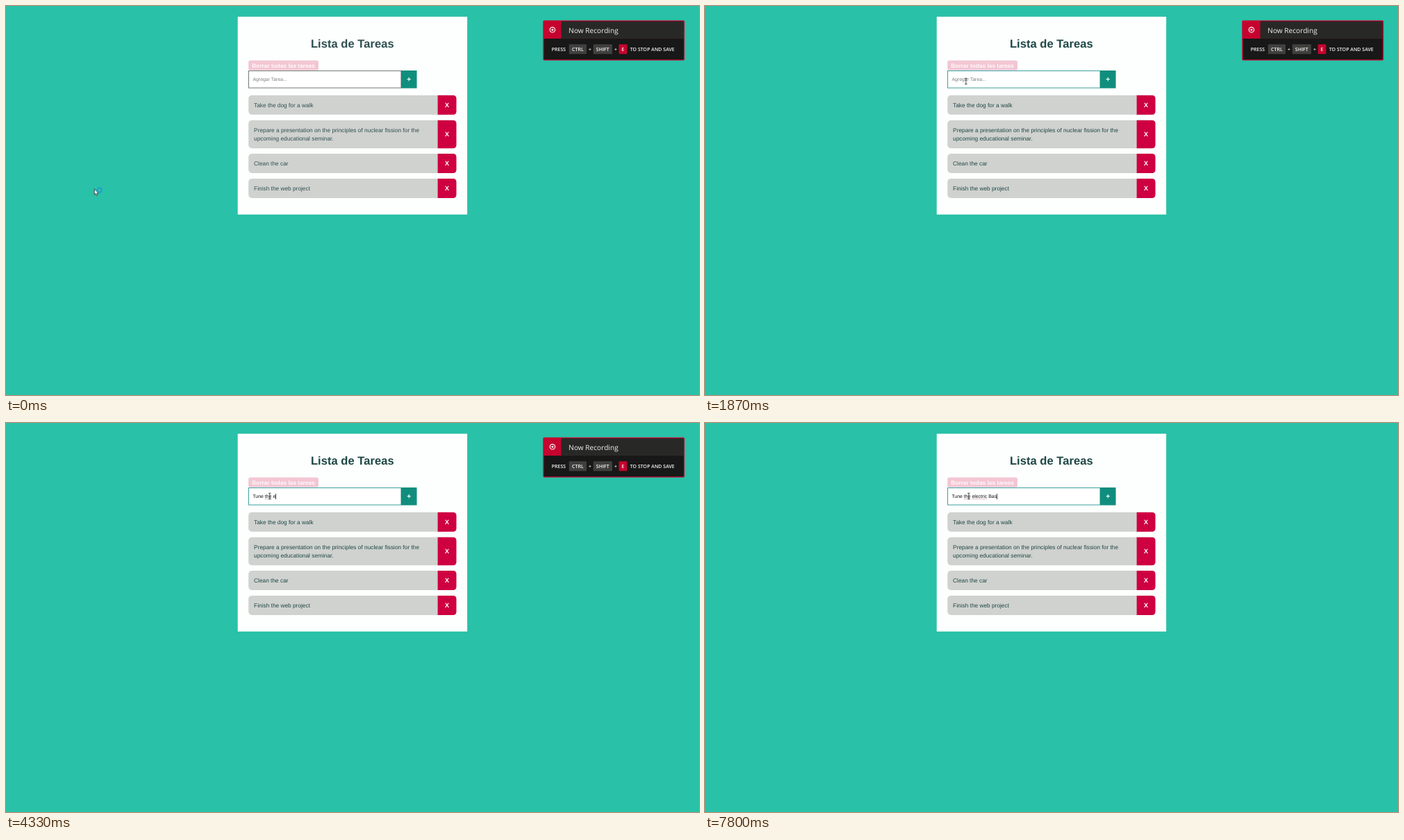
These frames come from a looping animation (998 by 561 pixels, 8 s). An HTML page:

```html
<!DOCTYPE html>
<html lang="es">
<head>
<meta charset="utf-8">
<title>Lista de Tareas</title>
<style>
  html, body { margin: 0; width: 100%; height: 100%; overflow: hidden; background: #29c1a7; }
  svg { display: block; width: 100vw; height: 100vh; --ink: #2f4f51; }
  svg.focused { --ink: #1e4746; }
  text { font: 8.32px "Liberation Sans", Arial, sans-serif; white-space: pre; text-rendering: geometricPrecision; }
  .bold { font-weight: 700; }
  .mid { text-anchor: middle; }
  .ink { fill: var(--ink); }
  .white { fill: #fff; }
  .title { font-size: 16.64px; }
  .field { font-size: 6.93px; }
  .frame { fill: #fff; stroke: #717776; stroke-width: 1; }
  .focused .frame { stroke: #3d9fa0; }
  .spell { stroke: #a8505c; stroke-width: .7; stroke-dasharray: .9 .8; }
  .hud text { font: 600 7px "Open Sans", "Noto Sans", sans-serif; fill: #f4f4f4; }
  .hud .head { font-size: 10.15px; font-weight: 500; }
</style>
</head>
<body>
<svg id="stage" viewBox="0 0 998 561" preserveAspectRatio="none">
  <rect x="333.7" y="15.5" width="330.5" height="285.2" fill="#fdfffe"/>
  <text class="title bold mid ink" x="498.8" y="60.2">Lista de Tareas</text>

  <rect x="349.2" y="78.6" width="100.8" height="14" rx="2.6" fill="#f3c6d3"/>
  <text class="bold" x="354.3" y="88.5" fill="#fff9fb">Borrar todas las tareas</text>

  <rect class="frame" x="349.5" y="93.5" width="219.5" height="24.6"/>
  <rect x="569" y="93" width="22.6" height="25.6" fill="#108e7d"/>
  <text class="bold mid white" x="580.3" y="109" style="font-size:10.4px">+</text>
  <text id="hint" class="field" x="355.4" y="108.2" fill="#7b7f7e">Agregar Tarea...</text>
  <text id="typed" class="field" x="355.4" y="108.2" fill="#111"></text>
  <g id="marks"></g>
  <rect id="caret" y="102" width=".8" height="8" fill="#111"/>

  <g id="items"></g>

  <g id="hud" class="hud">
    <rect x="773.4" y="20.8" width="203.8" height="57.8" rx="1.8" fill="#c6032f"/>
    <rect x="799.6" y="22.1" width="176.2" height="25" fill="#282927"/>
    <rect x="774.8" y="47.1" width="201" height="30.1" fill="#171817"/>
    <circle cx="787" cy="34.3" r="3.7" fill="none" stroke="#fff" stroke-width="1.1"/>
    <circle cx="787" cy="34.3" r="1.5" fill="#fff"/>
    <text class="head" x="810.3" y="38.5">Now Recording</text>
    <rect x="810.8" y="55.2" width="25.3" height="14" rx=".8" fill="#40413f"/>
    <rect x="845.8" y="55.2" width="27.2" height="14" rx=".8" fill="#40413f"/>
    <rect x="882.6" y="55.2" width="11.8" height="14" rx=".8" fill="#c6032f"/>
    <text x="785.8" y="64.8">PRESS</text>
    <text class="mid" x="823.4" y="64.8">CTRL</text>
    <text class="mid" x="841" y="64.8">+</text>
    <text class="mid" x="859.3" y="64.8">SHIFT</text>
    <text class="mid" x="877.9" y="64.8">+</text>
    <text class="mid" x="888.5" y="64.8">E</text>
    <text x="898.8" y="64.8">TO STOP AND SAVE</text>
  </g>

  <g id="pointer">
    <g id="arrow">
      <path d="M0 0V8.4L1.9 6.6 3.2 9.7 4.6 9.1 3.4 6.1H6Z" fill="#fff" stroke="#17302e" stroke-width=".8" stroke-linejoin="round"/>
      <circle id="busy" cx="7.2" cy="1.7" r="3.2" fill="none" stroke="#2398d4" stroke-width="1.7"/>
    </g>
    <path id="beam" d="M-1.7-4.2H1.7M0-4.2V4.2M-1.7 4.2H1.7" fill="none" stroke="#2c3030" stroke-width=".85"/>
  </g>
</svg>
<script>
const LOOP = 8000, STEP = 200 / 3, CARET_ON = 600, LEFT = 355.4;
const $ = id => document.getElementById(id);
const show = (el, on) => el.setAttribute('visibility', on ? 'visible' : 'hidden');

// Task list: top, height, lines
const tasks = [
  [128.8, 28, 'Take the dog for a walk'],
  [164.7, 40.5, 'Prepare a presentation on the principles of nuclear fission for the', 'upcoming educational seminar.'],
  [213, 28, 'Clean the car'],
  [248.9, 28, 'Finish the web project']
];
$('items').innerHTML = tasks.map(([y, h, ...lines]) => `
  <rect x="349.2" y="${y}" width="290" height="${h}" rx="5" fill="#d0d2cf"/>
  <path d="M621.7 ${y}h21.9q5 0 5 5v${h - 10}q0 5-5 5h-21.9z" fill="#ce0041"/>
  <text class="bold mid white" x="635" y="${y + h / 2 + 3.2}" style="font-size:9.2px">X</text>
  ${lines.map((s, i) => `<text class="ink" x="357.1" y="${y + 16.9 + i * 12.48}">${s}</text>`).join('')}`).join('');

// Typing: moment at which each character appears
const phrase = 'Tune the electric Bas';
const keys = [3000, 3400, 3530, 3670, 3730, 3930, 4070, 4130, 4200, 4330, 4470,
  5000, 5470, 5800, 6000, 6130, 6270, 6470, 7330, 7470, 7800];
const typed = $('typed');
const edges = [...phrase, ''].map((_, i) => {
  typed.textContent = phrase.slice(0, i);
  return LEFT + (i ? typed.getComputedTextLength() : 0);
});
const misspelt = [[5, 8, 4200], [9, 17, 6530]];
$('marks').innerHTML = misspelt.map(([a, b]) =>
  `<path class="spell" d="M${edges[a]} 109.6H${edges[b]}"/>`).join('');

// Pointer: time, x, y
const route = [[0, 127.3, 263.8], [870, 195, 200.6], [1730, 347, 122.5], [1870, 376, 108.4], [2130, 379.8, 105.4]];
const slope = (i, k) => {
  if (i === 0 || i === route.length - 1) return 0;
  const a = route[i - 1], b = route[i + 1];
  return i === 3 ? 0.03 * (k === 1 ? 1 : -1) : (b[k] - a[k]) / (b[0] - a[0]);
};
function along(t, k) {
  const last = route.length - 1;
  if (t >= route[last][0]) return route[last][k];
  const i = route.findIndex(p => p[0] > t) - 1;
  const a = route[i], b = route[i + 1], d = b[0] - a[0], u = (t - a[0]) / d;
  const u2 = u * u, u3 = u2 * u;
  return (2 * u3 - 3 * u2 + 1) * a[k] + (3 * u2 - 2 * u3) * b[k]
    + d * ((u3 - 2 * u2 + u) * slope(i, k) + (u3 - u2) * slope(i + 1, k));
}

function draw(t) {
  const tick = Math.floor((t + 4) / STEP) * STEP;
  const x = along(tick, 1), y = along(tick, 2);
  const overField = x > 350 && y < 118;
  $('pointer').setAttribute('transform', `translate(${x} ${y})`);
  show($('arrow'), !overField);
  show($('busy'), !overField && t < 400);
  show($('beam'), overField);

  $('stage').classList.toggle('focused', t >= 1800);
  show($('hud'), t < 4470);

  const count = keys.filter(k => k <= t).length;
  const lastKey = count ? keys[count - 1] : 2000;
  typed.textContent = phrase.slice(0, count);
  show($('hint'), !count);
  show($('caret'), t >= lastKey && t < lastKey + CARET_ON);
  $('caret').setAttribute('x', edges[count] - .2);
  misspelt.forEach(([, , from], i) => show($('marks').children[i], t >= from));
}

const start = performance.now();
function loop() {
  draw((performance.now() - start) % LOOP);
  requestAnimationFrame(loop);
}
loop();
</script>
</body>
</html>
```
